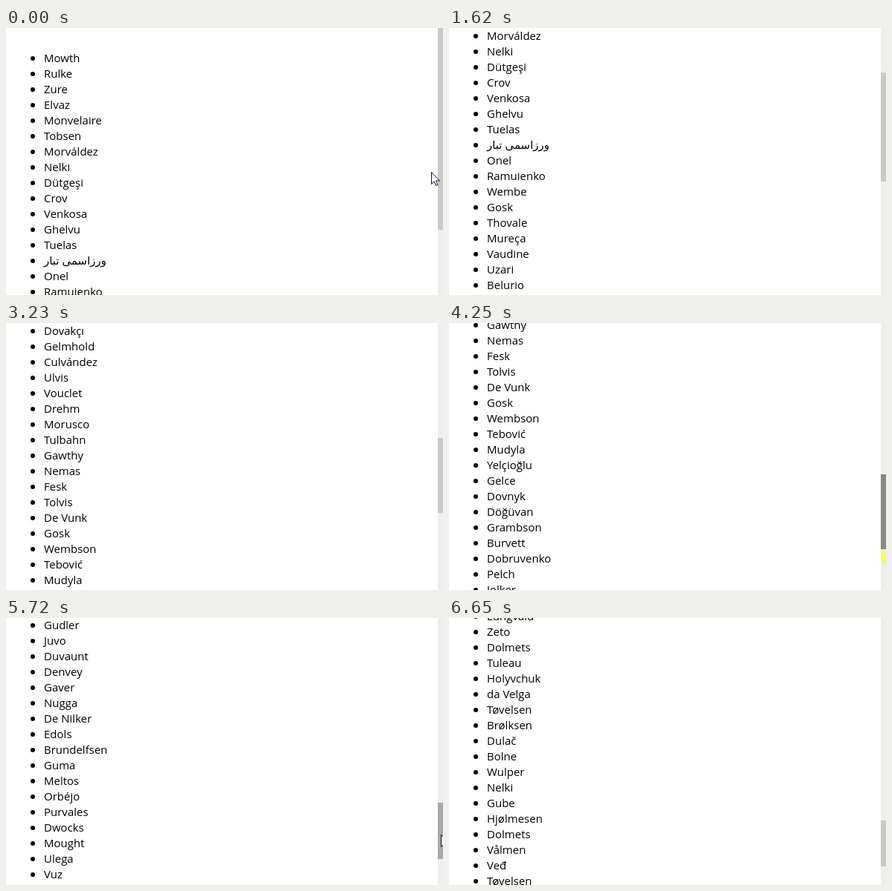
Animation of 588x360 px, one loop 8380 ms. Source, as an HTML page:

```html
<!DOCTYPE html>
<html lang="en">
<head>
<meta charset="utf-8">
<title>Endless list</title>
<style>
  html, body { margin: 0; width: 100%; height: 100%; overflow: hidden; background: #fff; }
  #stage { position: relative; width: 588px; height: 360px; overflow: hidden; }
  #list {
    position: absolute; left: 0; top: 30px; margin: 0; padding: 0; list-style: none;
    font: 15px/21px "Open Sans", "Noto Sans", "DejaVu Sans", sans-serif; color: #000;
  }
  #list li { position: relative; height: 21px; padding-left: 51px; white-space: nowrap; }
  #list li::before {
    content: ""; position: absolute; left: 33px; top: 8px;
    width: 6px; height: 6px; border-radius: 50%; background: #000;
  }
  #track, #thumb { position: absolute; left: 581px; width: 7px; }
  #track { top: 0; height: 360px; background: #eee; }
  #pointer { position: absolute; left: 0; top: 0; overflow: visible; }
</style>
</head>
<body>
<div id="stage">
  <ul id="list"></ul>
  <div id="track"></div>
  <div id="thumb"></div>
  <svg id="pointer" width="1" height="1">
    <circle id="halo" r="12" fill="#ff0" fill-opacity=".53"/>
    <path d="M.5 .5V16.5L4.2 13 6.7 18.6 9 17.6 6.6 12H11.6Z" fill="#fff" stroke="#101020"/>
  </svg>
</div>
<script>
const names = `Mowth,Rulke,Zure,Elvaz,Monvelaire,Tobsen,Morváldez,Nelki,Dütgeşi,Crov,
Venkosa,Ghelvu,Tuelas,ورزاسمی تبار,Onel,Ramuienko,Wembe,Gosk,Thovale,Mureça,
Vaudine,Uzari,Belurio,Trevock,Ilvaro,Hulmeck,Dovakçı,Gelmhold,Culvández,Ulvis,
Vouclet,Drehm,Morusco,Tulbahn,Gawthy,Nemas,Fesk,Tolvis,De Vunk,Gosk,
Wembson,Tebović,Mudyla,Yelçioğlu,Gelce,Dovnyk,Döğüvan,Grambson,Burvett,Dobruvenko,
Pelch,Jolker,Avendo,Strulle,Møgdal,Ceruvo,Gudler,Juvo,Duvaunt,Denvey,
Gaver,Nugga,De Nilker,Edols,Brundelfsen,Guma,Meltos,Orbéjo,Purvales,Dwocks,
Mought,Ulega,Vuz,Kelmo,Fjulvik,Obrete,Lungvald,Zeto,Dolmets,Tuleau,
Holyvchuk,da Velga,Tøvelsen,Brølksen,Dulač,Bolne,Wulper,Nelki,Gube,Hjølmesen,
Dolmets,Vålmen,Veđ,Tøvelsen`.split(/,\s*/);

const LOOP = 8380, VIEW = 364, CROP = 2.7, BATCH = 420, FRAME = 68;
const NORMAL = 0, HOVER = 1, PRESSED = 2;
const colours = ["#c9c9c9", "#a8a8a8", "#878787"];

// Times at which another batch of rows arrives
const loads = [1480, 2890, 4390, 6260];

// Thumb drags: start, end, from, to, easing power
const drags = [
  [1140, 1410, 0, 62.9, 1],
  [2620, 2820, 62.9, 158.5, 1],
  [3560, 4250, 158.5, 206.8, 1.6],
  [4320, 4320, 206.8, 252, 1],
  [6070, 6200, 252, 275.8, 1]
];

// Pointer: time, x, y, thumb state
const pointer = [
  [0, 572, 194, NORMAL], [130, 574, 190, NORMAL], [200, 576, 186, NORMAL],
  [270, 577, 183, NORMAL], [340, 578, 182, NORMAL], [610, 580, 181, HOVER],
  [670, 581, 181, HOVER], [1000, 581, 181, PRESSED], [1550, 600, 244, HOVER],
  [1620, 620, 244, NORMAL], [2220, 587, 196, HOVER], [2290, 593, 199, PRESSED],
  [3100, 600, 295, HOVER], [3230, 620, 295, NORMAL], [3420, 590, 222, HOVER],
  [3490, 593, 222, PRESSED], [4730, 600, 316, HOVER], [4790, 620, 316, NORMAL],
  [5720, 585, 292, HOVER], [5800, 593, 290, PRESSED], [6600, 600, 314, HOVER],
  [6650, 620, 314, NORMAL]
];

const el = id => document.getElementById(id);
const list = el("list"), thumb = el("thumb"), arrow = el("pointer"), halo = el("halo");

for (const name of names) {
  const row = document.createElement("li");
  row.textContent = name;
  list.append(row);
}

function thumbAt(t) {
  let pos = 0;
  for (const [start, end, from, to, power] of drags) {
    if (t < start) break;
    const steps = Math.round((end - start) / FRAME) + 1;
    const done = t >= end ? steps : 1 + Math.floor((t - start) / (end - start) * (steps - 1));
    pos = from + (to - from) * (done / steps) ** power;
  }
  return pos;
}

function draw(t) {
  const height = 483 + BATCH * loads.filter(time => t >= time).length;
  const pos = thumbAt(t);
  list.style.transform = `translateY(${-Math.round(pos * height / VIEW)}px)`;

  const [since, x, y, state] = pointer.findLast(row => t >= row[0]);
  thumb.style.top = Math.floor(pos - CROP) + "px";
  thumb.style.height = Math.ceil(VIEW * VIEW / height - 0.05) + "px";
  thumb.style.background = colours[state];

  // The page trails the held pointer by one step
  const pressed = state === PRESSED;
  const shift = pressed ? Math.round(thumbAt(t + 70) - thumbAt(since)) : 0;
  arrow.style.transform = `translate(${x}px, ${y + shift}px)`;
  halo.style.display = pressed ? "" : "none";
}

const begin = performance.now();
function tick() {
  draw((performance.now() - begin) % LOOP);
  requestAnimationFrame(tick);
}
tick();
</script>
</body>
</html>
```
